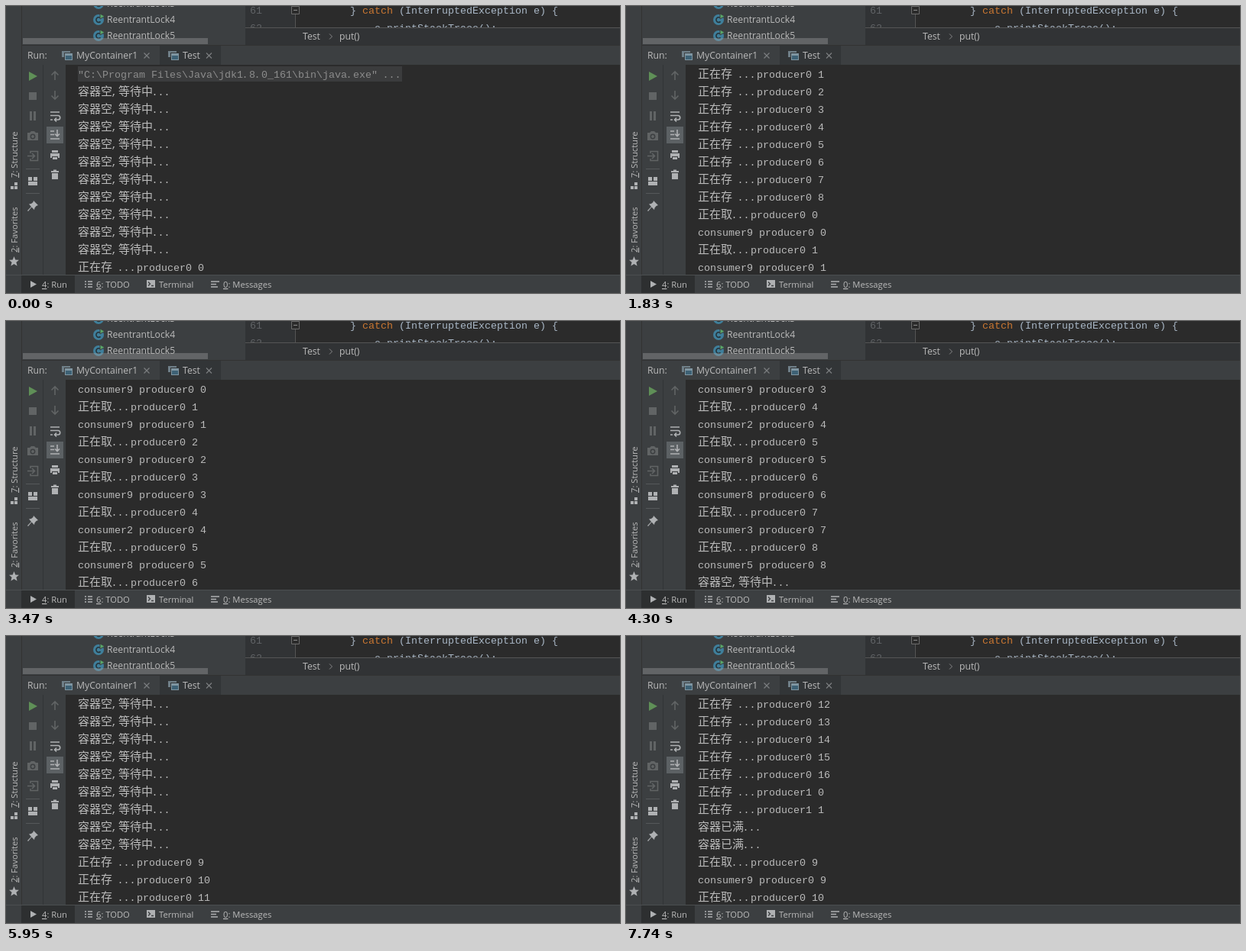
Animation, 803 px wide and 376 px high, one loop 8 s. Source, as an HTML page:

```html
<!DOCTYPE html>
<html lang="en">
<head>
<meta charset="utf-8">
<title>Run console</title>
<style>
html, body { margin: 0; width: 100%; height: 100%; overflow: hidden; background: #3c3f41; }
svg { display: block; }
text { white-space: pre; fill: #bbb; font: 12.2px "Open Sans", "Noto Sans", sans-serif; }
.small { font-size: 11.2px; }
.mono text { font: 13.33px "Liberation Mono", monospace; }
.mono .cjk { font: 300 15px "Noto Sans CJK SC", "Noto Sans CJK", sans-serif; }
.mono .command { fill: #8c8c8c; }
.code { fill: #a9b7c6; }
.num { fill: #606366; }
.u { text-decoration: underline; }
.line { fill: none; stroke: #afb1b3; stroke-width: 1.6; }
.fill { fill: #afb1b3; }
.off { stroke: #616465; }
.offFill { fill: #616465; }
</style>
</head>
<body>
<svg width="803" height="376" viewBox="0 0 803 376">
  <defs>
    <g id="class">
      <circle r="7" fill="#3f7f9b"/>
      <path d="M2.6-2.2A3.3 3.3 0 1 0 2.6 2.4" fill="none" stroke="#263238" stroke-width="1.6"/>
      <path d="M2-8 8-4.5 2-1Z" fill="#59a869" stroke="#3c3f41"/>
    </g>
    <g id="window">
      <path d="M-7 2V-6H4V-4H-4V2Z" fill="#6f7f88"/>
      <path d="M-3-3H7V6H-3Z" fill="#7f95a1"/>
      <path d="M-2 0H6V5H-2Z" fill="#3d6175"/>
    </g>
    <path id="close" d="M-3.5-3.5 3.5 3.5M3.5-3.5-3.5 3.5" stroke="#7b7e80" stroke-width="1.2"/>
    <clipPath id="editorClip"><path d="M313 0H803V29H313Z"/></clipPath>
  </defs>

  <!-- project tree -->
  <path d="M20.500 0V352" stroke="#323232"/>
  <text x="132" y="1">ReentrantLock3</text>
  <text x="132" y="22">ReentrantLock4</text>
  <text x="132" y="43">ReentrantLock5</text>
  <use href="#class" x="121" y="-3"/>
  <use href="#class" x="121" y="18"/>
  <use href="#class" x="121" y="39"/>
  <path d="M22 42H264V50H22Z" fill="#a6a6a6" opacity=".36"/>

  <!-- editor -->
  <path d="M313 0H803V51H313Z" fill="#2b2b2b"/>
  <path d="M313 0H379V29H313Z" fill="#313335"/>
  <g class="mono" clip-path="url(#editorClip)">
    <path d="M378.5 0V29" stroke="#555"/>
    <path d="M373.500 0.500H383.500V10.500H373.500Z" fill="#2b2b2b" stroke="#6b6b6b"/>
    <path d="M376 5.500H381" stroke="#8a8a8a"/>
    <text class="num" x="319" y="10">61</text>
    <text class="num" x="319" y="33">62</text>
    <text class="code" x="450" y="10">} <tspan fill="#cc7832">catch</tspan> (InterruptedException e) {</text>
    <text class="code" x="482" y="33">e.printStackTrace();</text>
  </g>
  <path d="M313 29H803V51H313Z" fill="#313335"/>
  <path d="M313 28.500H803" stroke="#555"/>
  <text x="388" y="44">Test</text>
  <path d="M423 36.500 426.500 40 423 43.500" fill="none" stroke="#888"/>
  <text x="436" y="44">put()</text>

  <!-- tool window header -->
  <path d="M21 51.500H803" stroke="#323232"/>
  <path d="M201 52H281V77H201Z" fill="#323537"/>
  <text x="28" y="69">Run:</text>
  <use href="#window" x="80" y="65"/>
  <text x="92" y="69">MyContainer1</text>
  <use href="#close" x="184" y="65"/>
  <use href="#window" x="219" y="65"/>
  <text x="231" y="69">Test</text>
  <use href="#close" x="265.500" y="65"/>

  <!-- run toolbar -->
  <path d="M48.500 77V352" stroke="#323537"/>
  <path d="M26 213.500H44M26 245.500H44" stroke="#55585a"/>
  <path d="M30 86 41 92 30 98Z" fill="#5f8f57"/>
  <path class="offFill" d="M30 113H40V123H30ZM31 138H34V150H31ZM36 138H39V150H36ZM28 166H31L33 164H37L39 166H42V176H28Z"/>
  <circle cx="35" cy="171" r="2.700" fill="#616465" stroke="#3c3f41" stroke-width="1.500"/>
  <path class="line off" d="M32 193V190.500H41.500V202.500H32V200M28 196.500H37M34 193 37.500 196.500 34 200"/>
  <path class="fill" d="M29 224H34V229H29ZM36 224H41V229H36ZM29 230H41V235H29Z"/>
  <path class="fill" d="M36 255 42 261 39.500 262 37.500 264.500 37 267 33.500 263.500 29 269 28 268 33 263 30 259.500 33 259 35.500 257Z"/>

  <path d="M53 158H75V180H53Z" fill="#5c6164"/>
  <path class="line off" d="M64 97V86M59.500 90.500 64 86 68.500 90.500M64 111V122M59.500 117.500 64 122 68.500 117.500"/>
  <path class="line" d="M58 139H70M58 143.500H68A2.700 2.700 0 0 1 68 149H64M58 149H61M66 146.500 63.500 149 66 151.500"/>
  <path class="line" d="M58 164H63M58 168.500H63M58 174H70M67 162V170M64 167.500 67 170.500 70 167.500"/>
  <path class="fill" d="M60 189H68V192H60ZM58 193H70V199H68V197H60V199H58ZM61 198H67V201H61Z"/>
  <path class="fill" d="M59 216H62V214.500H66V216H69V218H59ZM60 219H68V227H60Z"/>

  <!-- left stripe -->
  <text class="small" transform="translate(15 225) rotate(-90)"><tspan class="u">7</tspan>: Structure</text>
  <path class="fill" d="M11 231H15V235H11ZM6 236H10V240H6ZM11 236H15V240H11Z"/>
  <text class="small" transform="translate(15 323) rotate(-90)"><tspan class="u">2</tspan>: Favorites</text>
  <path class="fill" d="M10.500 328 12.300 332.500 17 332.800 13.400 335.800 14.600 340.500 10.500 338 6.400 340.500 7.600 335.800 4 332.800 8.700 332.500Z"/>

  <!-- console -->
  <path d="M78 77H803V352H78Z" fill="#2b2b2b"/>
  <path id="fold" d="M94 79H518V99H94Z" fill="#3b3c3d"/>
  <g id="console" class="mono"></g>

  <!-- bottom bar -->
  <path d="M0 352.500H803" stroke="#4b4e50"/>
  <path d="M20 353H90V376H20Z" fill="#2d2f30"/>
  <path class="fill" d="M32 360 40 364.500 32 369Z"/>
  <text class="small" x="47" y="369"><tspan class="u">4</tspan>: Run</text>
  <path class="line" d="M103 361H105M107 361H113M103 364.500H105M107 364.500H113M103 368H105M107 368H113"/>
  <text class="small" x="118" y="369"><tspan class="u">6</tspan>: TODO</text>
  <path class="fill" d="M184 359H195V369H184Z"/>
  <path d="M186 361.500 188.500 364 186 366.500M190 366.500H193" fill="none" stroke="#3c3f41" stroke-width="1.300"/>
  <text class="small" x="200" y="369">Terminal</text>
  <path class="line" d="M268 361H279M268 364.500H275M268 368H277"/>
  <text class="small" x="284" y="369"><tspan class="u">0</tspan>: Messages</text>
</svg>
<script>
const LOOP = 8000, ROWS = 12, ROW_HEIGHT = 23, LINES_PER_SCROLL = 3;
const LEFT = 94, BASELINE = 94, HALF = 8, FULL = 15;
const scrollTimes = [700, 1130, 1540, 1830, 2420, 2930, 3470, 3910, 4300,
                     4690, 5000, 5520, 5950, 6360, 6740, 7190, 7740];

const waiting = Array(10).fill("容器空,等待中...");
const put = (producer, n) => `正在存 ...producer${producer} ${n}`;
const puts = (from, to) => Array.from({ length: to - from + 1 }, (_, i) => put(0, from + i));
const take = (consumer, n) => [`正在取...producer0 ${n}`, `consumer${consumer} producer0 ${n}`];

const log = [
  String.raw`"C:\Program Files\Java\jdk1.8.0_161\bin\java.exe" ...`,
  ...waiting,
  ...puts(0, 8),
  ...[..."999928835"].flatMap(take),
  ...waiting,
  ...puts(9, 16), put(1, 0), put(1, 1),
  "容器已满...", "容器已满...",
  ...take(9, 9), take(9, 10)[0],
];

const panel = document.getElementById("console");
const fold = document.getElementById("fold");
let shownTop = -1;

// Runs sit on a grid of full and half cells; dots and commas lean left in theirs.
function lineMarkup(line, row) {
  let x = LEFT;
  const runs = line.match(/[\u4e00-\u9fff]+|[.,]+|[^\u4e00-\u9fff.,]+/g).map(run => {
    const wide = run[0] >= "\u4e00";
    const lean = /[.,]/.test(run) ? 1.6 : 0;
    const markup = `<tspan x="${x - lean}" class="${wide ? "cjk" : ""}">${run}</tspan>`;
    x += run.length * (wide ? FULL : HALF);
    return markup;
  });
  const kind = line.startsWith('"') ? "command" : "";
  return `<text class="${kind}" y="${BASELINE + row * ROW_HEIGHT}">${runs.join("")}</text>`;
}

function draw(now) {
  const time = now % LOOP;
  const top = LINES_PER_SCROLL * scrollTimes.filter(t => t <= time).length;
  if (top !== shownTop) {
    shownTop = top;
    fold.style.display = top ? "none" : "";
    panel.innerHTML = log.slice(top, top + ROWS).map(lineMarkup).join("");
  }
  requestAnimationFrame(draw);
}
draw(performance.now());
</script>
</body>
</html>
```
